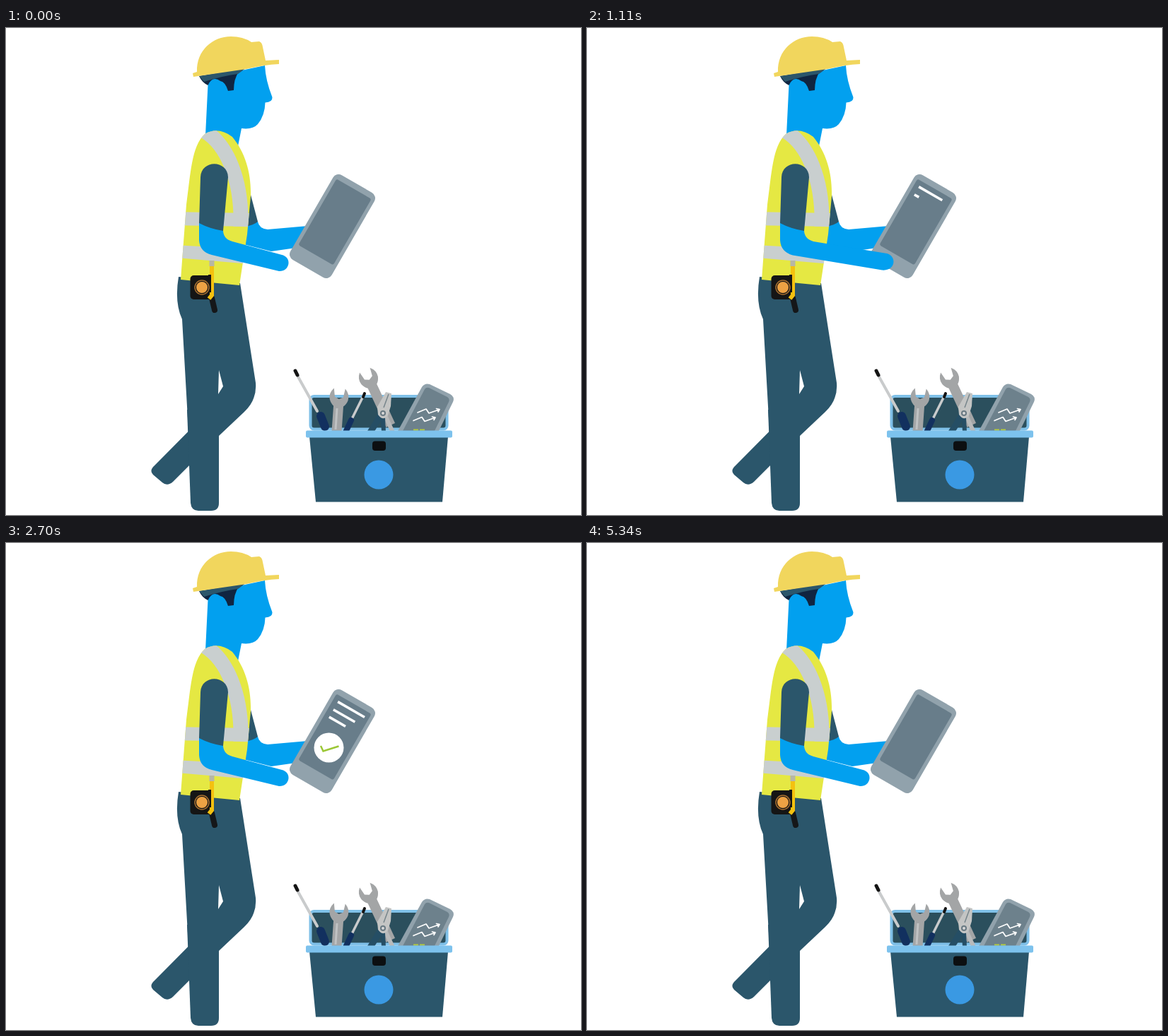
An HTML page that plays this animation: 813 px wide and 689 px high, repeating every 5.4 s.

```html
<!DOCTYPE html>
<html lang="en">
<head>
<meta charset="utf-8">
<title>Field worker</title>
<style>
  html, body { margin: 0; width: 100%; height: 100%; overflow: hidden; background: #fff; }
  svg { display: block; width: 100%; height: 100%; }

  .skin { fill: #02a0ef; }
  .slate { fill: #2b566b; }
  .band { fill: #c9cfcf; }
  .metal { fill: #a3a5a6; }
  .stroke { fill: none; stroke-linecap: round; stroke-linejoin: round; }

  .arm, .line, .check, .badge { animation: 5400ms ease-in-out infinite; }
  .arm { animation-name: reach; }
  .line, .check { fill: none; stroke-dasharray: 1 2; stroke-dashoffset: 1; }
  .line { stroke: #fff; stroke-width: 3.6; }
  .line1 { animation-name: line1; }
  .line2 { animation-name: line2; }
  .line3 { animation-name: line3; }
  .check { stroke: #9bc735; stroke-width: 2.5; animation-name: check; }
  .badge { transform-box: fill-box; transform-origin: center; animation-name: badge; }

  @keyframes reach {
    0%, 34.07%, 100% { d: path("M273 274L273 300Q274 317 291 321L386 344C400 345 405 327 392 321.5L320 302Q306 298 307 284Z"); }
    12.78%, 17.22% { d: path("M273 274L273 300Q274 317 291 321.5L420 342.5C441 344 441 320 425 318.5L320 302Q306 298 307 284Z"); }
  }
  @keyframes line1 {
    0%, 17.22%, 74.44%, 100% { stroke-dashoffset: 1; }
    21.67%, 70% { stroke-dashoffset: 0; }
  }
  @keyframes line2 {
    0%, 19.17%, 72.5%, 100% { stroke-dashoffset: 1; }
    23.61%, 68.06% { stroke-dashoffset: 0; }
  }
  @keyframes line3 {
    0%, 21.11%, 70.56%, 100% { stroke-dashoffset: 1; }
    25.56%, 66.67% { stroke-dashoffset: 0; }
  }
  @keyframes check {
    0%, 38.89% { stroke-dashoffset: 1; }
    50%, 100% { stroke-dashoffset: 0; }
  }
  @keyframes badge {
    0%, 25.65% { transform: scale(0); }
    33.06%, 78.33% { transform: scale(1); }
    82.22% { transform: scale(1.33); animation-timing-function: linear; }
    88.6% { transform: scale(.74); animation-timing-function: ease-out; }
    98.8%, 100% { transform: scale(0); }
  }
</style>
</head>
<body>
<svg viewBox="0 0 813 689" preserveAspectRatio="none">
  <!-- far arm -->
  <path class="skin" d="M338 276L356 274Q358 284 370 285L427 280L410 311L375 316L336 306Z"/>
  <path class="slate" d="M343 230L346 236L356 274Q350 279 338 281Z"/>

  <!-- tablet -->
  <g transform="translate(461.5 280.5) rotate(30)">
    <rect x="-33.7" y="-69.2" width="67.4" height="138.4" rx="9" fill="#91a2ac"/>
    <rect x="-28.5" y="-61" width="57" height="108" rx="3" fill="#687d8a"/>
    <path class="line line1" pathLength="1" d="M-21.3-52.2H22.4"/>
    <path class="line line2" pathLength="1" d="M-21.2-39.5H14"/>
    <path class="line line3" pathLength="1" d="M-21.2-27.5H5.5"/>
  </g>
  <g class="badge">
    <circle cx="456.5" cy="289.5" r="21" fill="#fff"/>
    <path class="check" pathLength="1" d="M445 287L448.5 294.5L470.5 287.5"/>
  </g>

  <!-- legs -->
  <path class="slate" d="M244 352L331 361L353 502Q355 526 337 543L301 577L236 642Q228 649 221 643L208 632Q202 626 210 619L258 570.5L249 412Q238 388 244 352ZM301 484L300 518L307 507Z"/>
  <path class="slate" d="M256 540H301V672Q301 683 290 683H272Q262 683 261 672Z"/>

  <!-- head and neck -->
  <path class="skin" d="M286 70L366 53Q367 74 376.500 98Q377 105 366.500 105.500Q366 124 356 136Q349 144 333 142L327 172H281Z"/>
  <path fill="#102541" d="M273 68L329 62Q322 72 322 88L314 89Q310 76 303 75Q292 67 285.500 81Q277 77 273 68Z"/>
  <path class="slate" d="M273 68L340 56L328 65Q305 68 280 76Z"/>
  <path fill="#f1d65d" d="M264 64L270 62C269 32 292 12 318 12Q335 12 347 20L358 19Q362 20 363 27L367 46L386 45V51Q365 52 340 58L265 69Z"/>

  <!-- vest -->
  <clipPath id="vest"><path d="M281 150Q300 139 320 154C339 177 347 207 346 238L341 292L330 364L247 356L255 250C261 208 262 167 281 150Z"/></clipPath>
  <g clip-path="url(#vest)">
    <rect x="240" y="140" width="110" height="230" fill="#e5e843"/>
    <path d="M281 146C311 164 334 212 332 281" fill="none" stroke="#c9cfcf" stroke-width="21"/>
    <path class="band" d="M240 260L350 262V281L240 279ZM240 307L345 313V334L240 325Z"/>
  </g>

  <!-- near arm -->
  <path class="skin arm" d="M273 274L273 300Q274 317 291 321L386 344C400 345 405 327 392 321.5L320 302Q306 298 307 284Z"/>
  <path class="slate" d="M273 276L275 211C276 186 313 186 314 211L307 287Q288 284 273 276Z"/>

  <!-- tape measure -->
  <path d="M291 382L295 399" stroke="#151719" stroke-width="8" stroke-linecap="round"/>
  <rect x="260.5" y="350" width="33.5" height="34" rx="5" fill="#151515"/>
  <path d="M291 336V378L287 383" fill="none" stroke="#f4c10f" stroke-width="6"/>
  <rect x="287.5" y="329" width="7" height="8" fill="#b7b6a4"/>
  <path d="M288 349V374" stroke="#151515" stroke-width="4"/>
  <circle cx="277" cy="367" r="10" fill="none" stroke="#a87030" stroke-width="1.5"/>
  <circle cx="277" cy="367" r="8" fill="#eda244"/>

  <!-- toolbox lid -->
  <rect x="430.5" y="521" width="193" height="46.5" rx="5" fill="#2b4f5d" stroke="#7fc0e8" stroke-width="4"/>

  <!-- screwdrivers -->
  <g class="stroke">
    <path d="M411 490L440 542" stroke="#c9cbcc" stroke-width="4"/>
    <path d="M409 485L412 491" stroke="#141414" stroke-width="5"/>
    <path d="M445 549L451 564" stroke="#12305f" stroke-width="12"/>
    <path d="M505 521L489 553" stroke="#c9cbcc" stroke-width="3.5"/>
    <path d="M507 517L505 522" stroke="#141414" stroke-width="4"/>
    <path d="M488 555L480 572" stroke="#12305f" stroke-width="8"/>
  </g>

  <!-- wrenches -->
  <defs>
    <path id="wrench" class="metal" d="M-8-11Q-15-4-13 5Q-11 11-7 14L-7 75H7V14Q11 11 13 5Q15-4 8-11L6 1L0 4L-6 1Z"/>
  </defs>
  <use href="#wrench" transform="translate(471 521) rotate(4)"/>
  <path d="M468 538L466 568" stroke="#c0c2c3" stroke-width="3"/>
  <use href="#wrench" transform="translate(512 494) rotate(-25)"/>

  <!-- pliers -->
  <g class="stroke">
    <path d="M531 546L515 572" stroke="#254e65" stroke-width="9"/>
    <path d="M535 546L547 572" stroke="#b8babb" stroke-width="6"/>
    <path d="M533 552L534 572" stroke="#254e65" stroke-width="6"/>
  </g>
  <path fill="#c4c5c4" d="M526 547L525 536L537 515L545 517L544 535L540 548Q533 557 526 547Z"/>
  <path d="M541 518L534 537" stroke="#77858b" stroke-width="1.5"/>
  <circle cx="533" cy="545" r="4" fill="#687982"/>
  <circle cx="533" cy="545" r="2" fill="#d8d8d8"/>

  <!-- small tablet -->
  <path fill="#91a2ac" d="M553 572L588 508Q592 502 599 504L628 518Q635 522 632 529L611 572Z"/>
  <path fill="#6d818c" d="M560 572L592 511Q594 508 598 509L624 522Q628 525 626 529L605 572Z"/>
  <g class="stroke" stroke="#fff" stroke-width="1.7">
    <path id="trend" d="M582 544L594 539L598 545L612 540M608.5 538.5L613 539.5L611 543"/>
    <use href="#trend" x="-6" y="11.5"/>
  </g>
  <path d="M576 568.5H592" stroke="#b4cc3e" stroke-width="2" stroke-dasharray="7 2"/>

  <!-- toolbox body -->
  <path class="slate" d="M429 578H625L617 670.5H438Z"/>
  <rect x="424" y="569.5" width="207" height="10" rx="2" fill="#7dc2ed"/>
  <rect x="518" y="584.5" width="19" height="13.5" rx="4" fill="#0c0f11"/>
  <circle cx="527" cy="632" r="20.5" fill="#3a99e3"/>
</svg>
</body>
</html>
```
